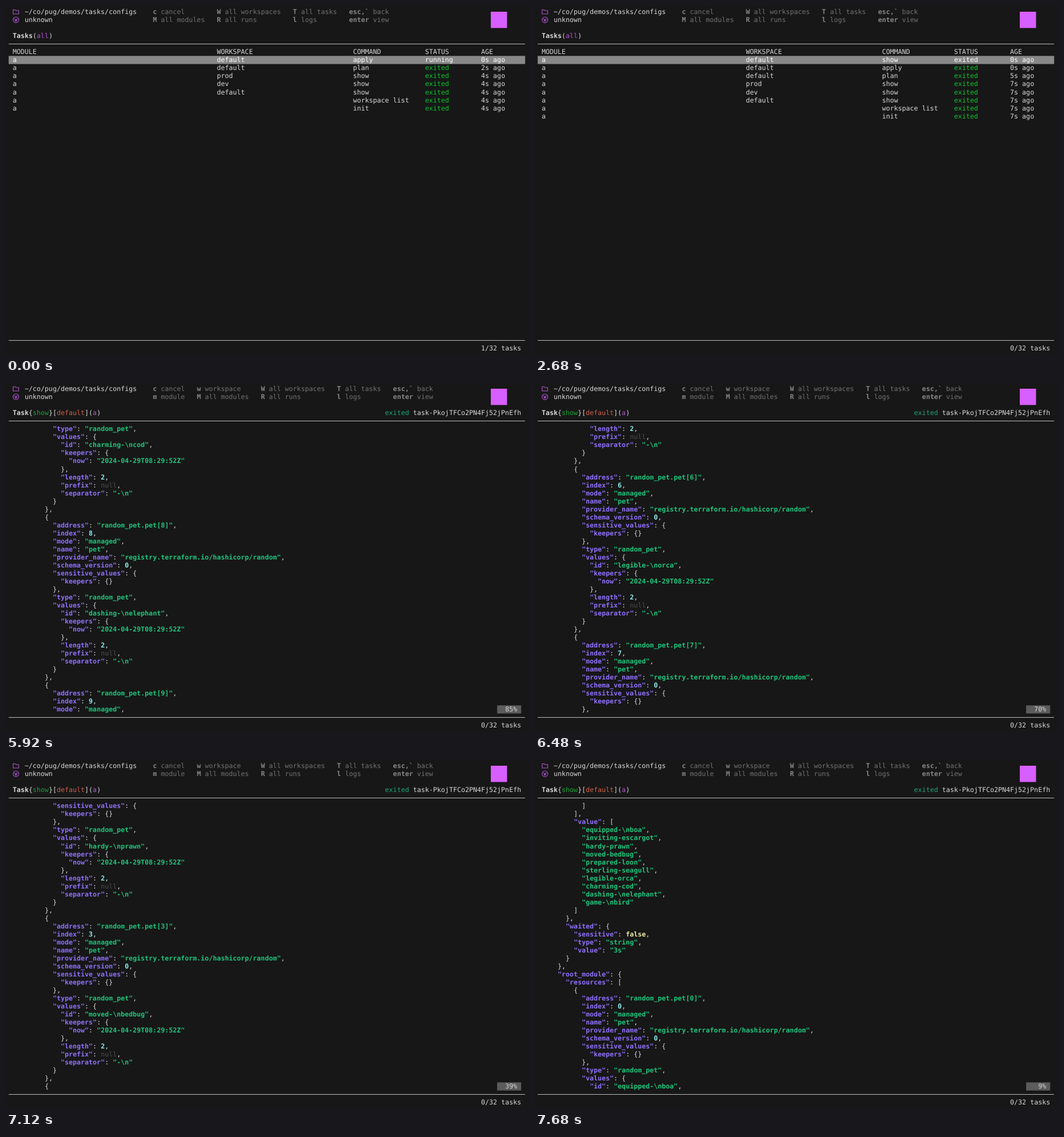
Animation of 917 by 611 pixels, one loop 8000 ms. Source, as an HTML page:

```html
<!DOCTYPE html>
<html lang="en">
<head>
<meta charset="utf-8">
<title>Task list</title>
<style>
  html, body { margin: 0; width: 100%; height: 100%; overflow: hidden; background: #171717; }
  svg { display: block; width: 917px; height: 611px; }
  text {
    font: 11.66px "DejaVu Sans Mono", "Noto Sans Mono", monospace;
    white-space: pre;
    text-rendering: geometricPrecision;
  }
  .bold { font-weight: bold; }
</style>
</head>
<body>
<svg viewBox="0 0 917 611">
  <rect width="917" height="611" fill="#171717"/>
  <path d="M4.7 66.5H910M4.7 585.5H910" stroke="#bdbdbd"/>
  <rect x="850" y="10" width="28.5" height="28.5" fill="#d75fff"/>
  <g fill="none" stroke="#b455d8" stroke-width="1.1">
    <path d="M12.5 6.5h3.4l1.3 1.5h5v6h-9.7z"/>
    <circle cx="17.4" cy="24.2" r="5"/>
    <path d="M15.2 22.3l2.2 4 2.2-4" stroke-width="1.6"/>
  </g>
  <g id="screen"></g>
</svg>
<script>
const LOOP = 8000, CELL_W = 7.02, CELL_H = 14.03, LEFT = 4.7, PAGE = 36;
const C = {
  text: '#d8d8d8', white: '#ffffff', dim: '#727272', key: '#878787', bar: '#888888',
  exited: '#08c52f', purple: '#b455d8', show: '#16a637', workspace: '#d0604c', status: '#1fa57c',
  name: '#8f70fa', string: '#1fc57c', number: '#8cecec', bool: '#eef0a6', nil: '#4d4d4d', badge: '#5c5c5c'
};
const screen = document.getElementById('screen');

const escapeXml = s => s.replace(/&/g, '&amp;').replace(/</g, '&lt;');
const put = (row, col, text, color = C.text, bold = false) =>
  `<text x="${(LEFT + col * CELL_W).toFixed(2)}" y="${(14.2 + row * CELL_H).toFixed(2)}" ` +
  `fill="${color}"${bold ? ' class="bold"' : ''}>${escapeXml(text)}</text>`;
const box = (row, col, width, color) =>
  `<rect x="${LEFT + col * CELL_W}" y="${3.2 + row * CELL_H}" width="${width * CELL_W}" height="14.2" fill="${color}"/>`;

// Places [text, color, bold] parts one after another.
function run(row, col, parts) {
  return parts.map(([text, color, bold]) => {
    const out = put(row, col, text, color, bold);
    col += text.length;
    return out;
  }).join('');
}

// Each group is [column, gap, key, label, key, label], top row then second row.
const help = groups => groups.map(([col, gap, ...items]) =>
  [0, 1].map(row =>
    put(row, col, items[row * 2], C.key, true) + put(row, col + gap, items[row * 2 + 1], C.dim)
  ).join('')).join('');

const header = put(0, 4, '~/co/pug/demos/tasks/configs') + put(1, 4, 'unknown');
const listHelp = help([
  [36, 2, 'c', 'cancel', 'M', 'all modules'],
  [52, 2, 'W', 'all workspaces', 'R', 'all runs'],
  [71, 2, 'T', 'all tasks', 'l', 'logs'],
  [85, 6, 'esc,`', 'back', 'enter', 'view']
]);
const taskHelp = help([
  [36, 2, 'c', 'cancel', 'm', 'module'],
  [47, 2, 'w', 'workspace', 'M', 'all modules'],
  [63, 2, 'W', 'all workspaces', 'R', 'all runs'],
  [82, 2, 'T', 'all tasks', 'l', 'logs'],
  [96, 6, 'esc,`', 'back', 'enter', 'view']
]);
const footer = running => put(42, 118, `${running}/32 tasks`);

const COLUMNS = [1, 52, 86, 104, 118];
const passed = (t, times) => times.filter(at => at <= t).length;

function listView(t) {
  const applied = t >= 2480, listed = t >= 2520, shown = t >= 2640;
  const oldest = 4 + passed(t, [600, 1600, 2600]);
  const older = 4 + passed(t, [680, 1680, 2600]);
  const plan = 2 + passed(t, [760, 1760, 2680]);
  const rows = [
    ['default', 'apply', applied ? 'exited' : 'running', applied ? 0 : passed(t, [400, 1400, 2400])],
    ['default', 'plan', 'exited', plan],
    ['prod', 'show', 'exited', older],
    ['dev', 'show', 'exited', older],
    ['default', 'show', 'exited', older],
    ['', 'workspace list', 'exited', oldest],
    ['', 'init', 'exited', oldest]
  ];
  if (listed) rows.unshift(['default', 'show', shown ? 'exited' : 'running', 0]);

  const titles = ['MODULE', 'WORKSPACE', 'COMMAND', 'STATUS', 'AGE'];
  const body = rows.map(([space, command, status, age], i) =>
    ['a', space, command, status, `${age}s ago`].map((text, k) => {
      const color = i === 0 ? C.white : text === 'exited' ? C.exited : C.text;
      return put(6 + i, COLUMNS[k], text, color);
    }).join('')).join('');
  const running = (applied ? 0 : 1) + (listed && !shown ? 1 : 0);

  return header + listHelp +
    run(3, 1, [['Tasks', C.text, true], ['('], ['all', C.purple], [')']]) +
    titles.map((title, k) => put(5, COLUMNS[k], title)).join('') +
    box(6, 0, 129, C.bar) + body + footer(running);
}

const provider = name => `"provider_name": "registry.terraform.io/hashicorp/${name}",`;
const petIds = ['equipped-boa', 'inviting-escargot', 'hardy-prawn', 'moved-bedbug', 'prepared-loon',
  'sterling-seagull', 'legible-orca', 'charming-cod', 'dashing-elephant', 'game-bird'];
const wrapId = id => id.replace('-', '-\\n');

const petLines = (id, i) => [
  `"address": "random_pet.pet[${i}]",`, `"index": ${i},`, '"mode": "managed",', '"name": "pet",',
  provider('random'), '"schema_version": 0,',
  '"sensitive_values": {', '"keepers": {}', '},',
  '"type": "random_pet",', '"values": {', `"id": "${wrapId(id)}",`,
  '"keepers": {', '"now": "2024-04-29T08:29:52Z"', '},',
  '"length": 2,', '"prefix": null,', '"separator": "-\\n"', '}', '},', '{'
];

const lines = [
  ']', '],', '"value": [',
  ...petIds.map((id, i) => `"${[0, 8, 9].includes(i) ? wrapId(id) : id}"${i < 9 ? ',' : ''}`),
  ']', '},',
  '"waited": {', '"sensitive": false,', '"type": "string",', '"value": "3s"', '}', '},',
  '"root_module": {', '"resources": [', '{',
  ...petIds.flatMap(petLines),
  '"address": "time_sleep.wait_three_seconds",', '"mode": "managed",', '"name": "wait_three_seconds",',
  provider('time'), '"schema_version": 0,', '"sensitive_values": {},', '"type": "time_sleep",',
  '"values": {', '"create_duration": "3s",', '"destroy_duration": null,',
  '"id": "2024-\\n04-29T08:29:55Z",', '"triggers": null',
  '}', '}', ']', '}', '}', '}'
];

let depth = 6;
const output = lines.map(line => {
  if (/^[}\]]/.test(line)) depth--;
  const indent = depth * 2;
  if (/[{[]$/.test(line)) depth++;
  return { line, indent };
});

function token(text, next) {
  if (text[0] === '"') return [text, next === ':' ? C.name : C.string, true];
  if (/^\d/.test(text)) return [text, C.number, true];
  if (text === 'false') return [text, C.bool, true];
  return [text, text === 'null' ? C.nil : C.text, false];
}

function jsonLine(row, { line, indent }) {
  const parts = [...line.matchAll(/"[^"]*"|\d+|null|false|[^"\da-z]+/g)]
    .map(m => token(m[0], line[m.index + m[0].length]));
  return run(row, 1 + indent, parts);
}

function taskView(page) {
  const top = page * PAGE;
  const percent = `${[9, 24, 39, 54, 70, 85, 100][page]}%`;
  return header + taskHelp +
    run(3, 1, [['Task', C.text, true], ['{'], ['show', C.show], ['}['], ['default', C.workspace],
      [']('], ['a', C.purple], [')']]) +
    put(3, 94, 'exited', C.status) + put(3, 101, 'task-PkojTFCo2PN4Fj52jPnEfh') +
    output.slice(top, top + PAGE).map((entry, i) => jsonLine(5 + i, entry)).join('') +
    box(40, 122, 6, C.badge) + put(40, 127 - percent.length, percent) + footer(0);
}

const OPEN = 4920;
const PAGE_UPS = [5920, 6480, 6520, 7120, 7640, 7680];
let shownMarkup = '';

function render(t) {
  const markup = t < OPEN ? listView(t) : taskView(6 - passed(t, PAGE_UPS));
  if (markup !== shownMarkup) screen.innerHTML = shownMarkup = markup;
}

const start = performance.now();
function tick() {
  render((performance.now() - start) % LOOP);
  requestAnimationFrame(tick);
}
tick();
</script>
</body>
</html>
```
